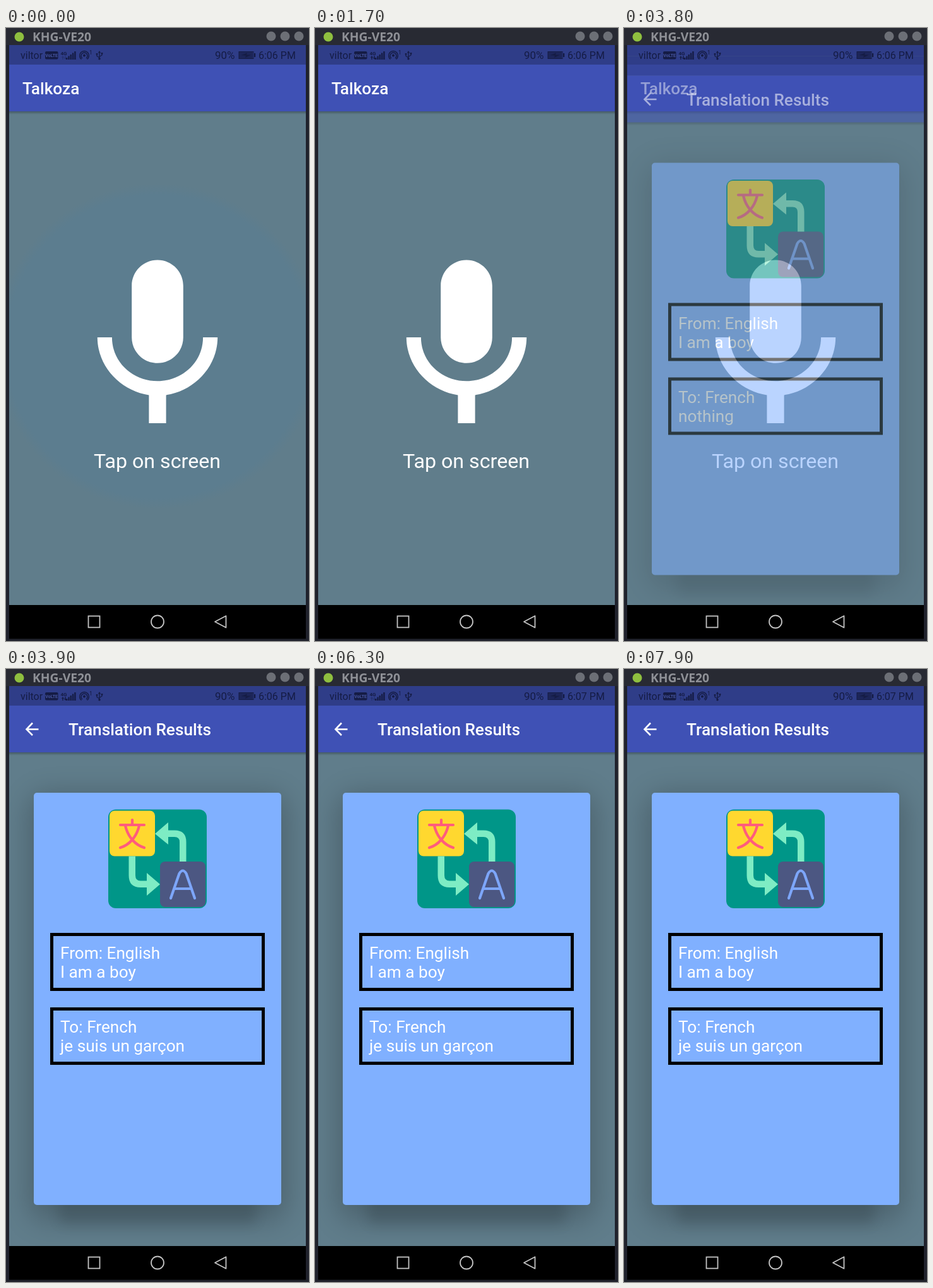
Animation, 480 px wide and 971 px high, one loop 8000 ms. Source, as an HTML page:

```html
<!DOCTYPE html>
<html lang="en">
<head>
<meta charset="utf-8">
<title>Voice translation</title>
<style>
  html, body { margin: 0; width: 100%; height: 100%; overflow: hidden; background: #20222c; }
  svg { display: block; width: 100%; height: 100%; font-family: Roboto, sans-serif; }
  .title { font-size: 26.2px; font-weight: 500; fill: #fff; }
  .body { font-size: 26.2px; fill: #fff; }
  .status { fill: #151c45; font-size: 16px; }
  .line { fill: none; stroke: #151c45; }
  .soft { filter: blur(22px); }
  .softer { filter: blur(10px); }
</style>
</head>
<body>
<svg viewBox="0 0 480 971">
  <defs>
    <clipPath id="display"><rect x="5" y="27" width="470" height="887"/></clipPath>
    <linearGradient id="barShade" x2="0" y2="1">
      <stop stop-color="#000" stop-opacity=".28"/>
      <stop offset="1" stop-color="#000" stop-opacity="0"/>
    </linearGradient>
    <radialGradient id="rippleFill">
      <stop offset=".93" stop-color="#5c7d8f"/>
      <stop offset="1" stop-color="#5c7d8f" stop-opacity="0"/>
    </radialGradient>
    <g id="window">
      <rect x="5" y="27" width="470" height="887" fill="#607d8b"/>
    </g>
    <g id="bars">
      <rect x="5" y="27" width="470" height="31" fill="#2f3d88"/>
      <rect x="5" y="58" width="470" height="74" fill="#3f51b5"/>
      <rect x="5" y="132" width="470" height="5" fill="url(#barShade)"/>
    </g>
  </defs>

  <rect width="480" height="971" fill="#20222c"/>
  <rect width="480" height="27" fill="#282a33"/>
  <circle cx="21" cy="14" r="7.5" fill="#8fbf3f"/>
  <text x="42" y="21" font-family="Noto Sans, sans-serif" font-weight="700" font-size="19.3" fill="#8e9096">KHG-VE20</text>
  <g fill="#6c6f76">
    <circle cx="420" cy="13" r="7.5"/><circle cx="442" cy="13" r="7.5"/><circle cx="464" cy="13" r="7.5"/>
  </g>

  <g clip-path="url(#display)">
    <!-- Home screen -->
    <use href="#window"/>
    <circle id="ripple" cx="240" cy="504" r="258" fill="url(#rippleFill)"/>
    <use href="#bars"/>
    <text class="title" x="26" y="105">Talkoza</text>
    <path transform="translate(76.8 340.4) scale(13.6)" fill="#fff" d="M12 14c1.66 0 3-1.34 3-3V5c0-1.66-1.34-3-3-3S9 3.34 9 5v6c0 1.66 1.34 3 3 3zm5.3-3c0 3-2.54 5.1-5.3 5.1S6.7 14 6.7 11H5c0 3.41 2.72 6.23 6 6.72V21h2v-3.28c3.28-.48 6-3.3 6-6.72z"/>
    <text x="239.5" y="697" text-anchor="middle" font-size="32.2" fill="#fff">Tap on screen</text>

    <!-- Results screen -->
    <g id="results">
      <use href="#window"/>
      <rect class="soft" x="34" y="196" width="412" height="680" rx="30" opacity=".2"/>
      <rect class="softer" x="84" y="800" width="312" height="80" rx="10" opacity=".12"/>
      <use href="#bars"/>
      <path d="M51.5 95.5H33M42 85.5L32.5 95.5L42 105" fill="none" stroke="#fff" stroke-width="2.6"/>
      <text class="title" x="99" y="105">Translation Results</text>
      <rect x="44" y="196" width="392" height="653" rx="5" fill="#80b0ff"/>

      <rect x="162" y="222.5" width="156" height="156.5" rx="12" fill="#009688"/>
      <rect x="164" y="224.5" width="72" height="72" rx="8" fill="#ffd82f"/>
      <rect x="244" y="305" width="72" height="72" rx="8" fill="#4c5782"/>
      <g fill="#7eecc4">
        <path d="M194.5 296.5H205V327Q205 335.5 213 335.5H223V323L244 341L223 359V346H213Q194.5 346 194.5 327Z"/>
        <path d="M285.5 305H275V274Q275 266 267 266H257V278L236 261L257 243V255.5H267Q285.5 255.5 285.5 274Z"/>
      </g>
      <g fill="none" stroke-width="4.2" stroke-linecap="round">
        <path stroke="#ff5c7c" d="M200 239V247M181 247H219M189 248C193 266 205 279 219 283M211 248C207 266 195 279 181 283"/>
        <path stroke="#7da6fa" d="M261 363L274.5 324Q280 315 285.5 324L299 363M267 348H293"/>
      </g>

      <g fill="none" stroke="#000" stroke-width="5">
        <rect x="72.5" y="420.5" width="335" height="87"/>
        <rect x="72.5" y="538.5" width="335" height="86"/>
      </g>
      <g class="body">
        <text x="86" y="459">From: English</text>
        <text x="86" y="489">I am a boy</text>
        <text x="86" y="576">To: French</text>
        <text x="86" y="606" id="translation"></text>
      </g>
    </g>
  </g>

  <!-- Phone status -->
  <g class="status">
    <text x="23" y="49">viltor</text>
    <rect x="62" y="37" width="20.5" height="12.5" rx="2"/>
    <text x="72.2" y="46" text-anchor="middle" font-size="7" font-weight="700" fill="#4655a0">VoLTE</text>
    <text x="86.5" y="42.5" font-size="8" font-weight="700">4G</text>
    <path id="traffic" d="M88 47L90 44L92 47H90.7V50H89.3V47ZM92 47H93.3V44H94.7V47H96L94 50Z"/>
    <path d="M95 47h2.4v3h-2.4zM98.3 44.5h2.4v5.5h-2.4zM101.6 42h2.4v8h-2.4zM104.9 39.5h2.4v10.5h-2.4zM108.2 37h2.4v13h-2.4z"/>
    <circle cx="124" cy="43.5" r="2"/>
    <path class="line" stroke-width="1.5" d="M121 48A5 5 0 1 1 127 48M119.5 49.5A7.3 7.3 0 1 1 128.5 49.5"/>
    <text x="132" y="42" font-size="8.5">1</text>
    <path class="line" stroke-width="1.3" d="M148 38V49M148 47L144 44.5V41M148 45.5L152 43V40"/>
    <path d="M145.8 39.5L148 36L150.2 39.5ZM142.7 40h2.6v2.6h-2.6zM150.7 39h2.6v2.6h-2.6z"/>
    <circle cx="148" cy="48.8" r="1.7"/>
    <text x="331" y="49" font-size="17">90%</text>
    <rect x="369" y="37.5" width="22" height="11" opacity=".7"/>
    <rect class="line" x="369" y="37.5" width="23" height="11"/>
    <rect x="393" y="40" width="2.2" height="6"/>
    <path d="M373 43L382 39.5L381 42.5H388L379 47L380 43.7Z"/>
    <text x="400" y="49" id="clock"></text>
  </g>

  <!-- Navigation -->
  <rect x="5" y="914" width="470" height="53.5" fill="#000"/>
  <g fill="none" stroke="#c4c4c4" stroke-width="1.8">
    <rect x="130.5" y="931.5" width="18" height="18"/>
    <circle cx="240" cy="940.5" r="10"/>
    <path d="M348.5 931.2V949.8L331 940.5Z" stroke-linejoin="round"/>
  </g>
</svg>
<script>
  const LOOP = 8000, STEP = 100, OPEN = 3700;
  const byId = id => document.getElementById(id);
  const [ripple, results, translation, clock, traffic] =
    ['ripple', 'results', 'translation', 'clock', 'traffic'].map(byId);

  // Offset and opacity of the results screen while it opens
  const opening = [[183, .08], [17.5, .54], [0, 1]];

  function draw(now) {
    const t = Math.floor(now % LOOP / STEP) * STEP;
    ripple.setAttribute('opacity', Math.max(0, 1 - t / 900));

    const [offset, opacity] = t < OPEN ? [0, 0] : opening[Math.min(2, (t - OPEN) / STEP)];
    results.setAttribute('transform', `translate(0 ${offset})`);
    results.setAttribute('opacity', opacity);

    translation.textContent = t < OPEN + 2 * STEP ? 'nothing' : 'je suis un garçon';
    clock.textContent = t < 6100 ? '6:06 PM' : '6:07 PM';
    traffic.setAttribute('opacity', t >= 1700 && t < 5500 ? 1 : .35);
  }

  const start = performance.now();
  function tick() {
    draw(performance.now() - start);
    requestAnimationFrame(tick);
  }
  tick();
</script>
</body>
</html>
```
